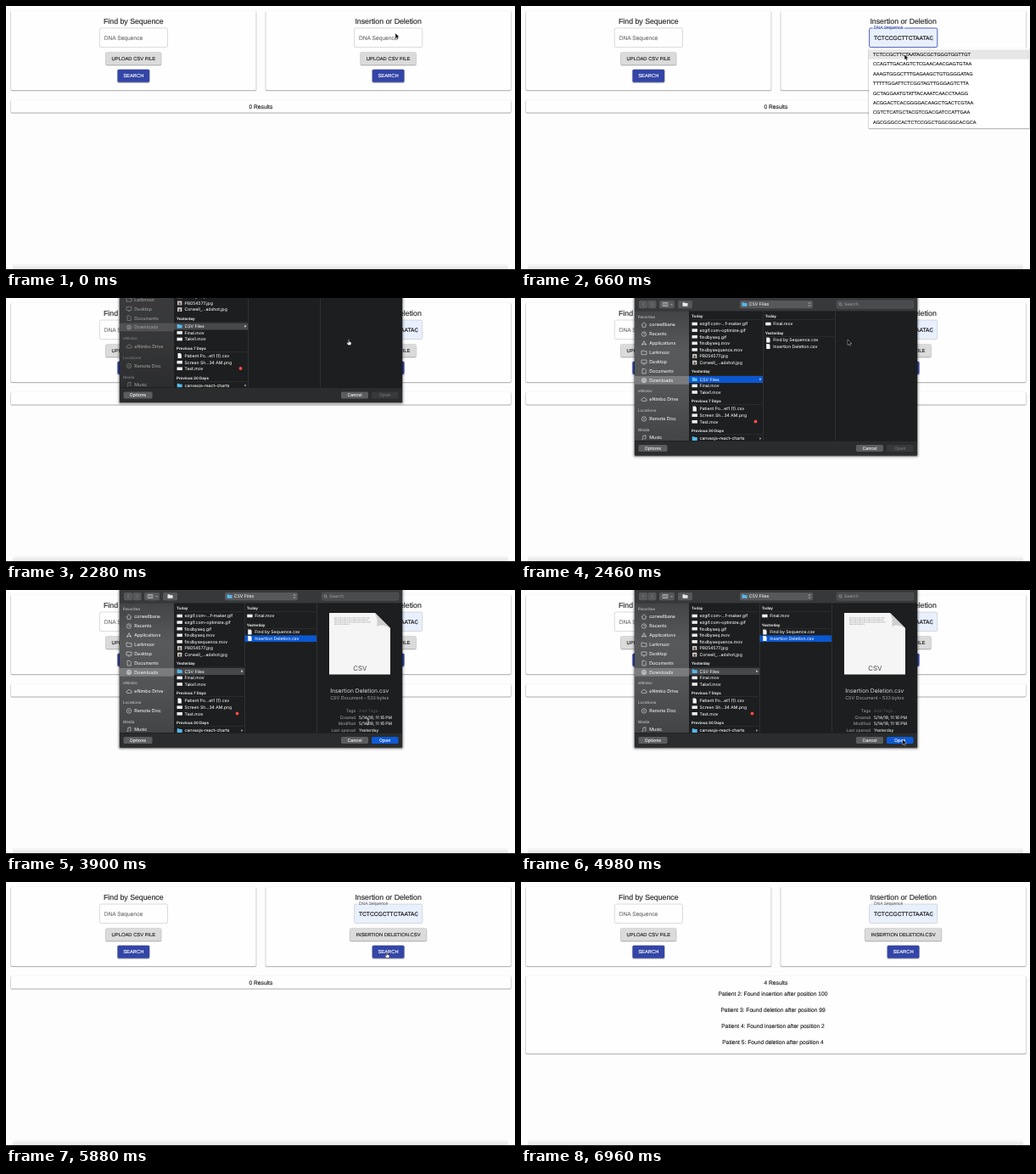
Write an HTML page that moves like this. It is 600 by 311 pixels and loops after 7.2 s.

```html
<!DOCTYPE html>
<html lang="en">
<head>
<meta charset="utf-8">
<title>DNA sequence search</title>
<style>
html, body { margin: 0; width: 100%; height: 100%; overflow: hidden; background: #fdfdfd; }
svg { display: block; width: 100vw; height: 100vh; }
text { font-family: "Liberation Sans", Arial, sans-serif; text-rendering: geometricPrecision; white-space: pre; stroke-width: .14; }
.mac text { font-family: Inter, Roboto, sans-serif; stroke-width: .06; }
</style>
</head>
<body>
<svg id="stage" viewBox="0 0 600 311"></svg>
<script>
const LOOP = 7200, STEP = 60;
const stage = document.getElementById('stage');

// Moments at which the interface changes state
const FOCUS = 120, MENU = 420, FILL = 600, MENU_END = 840, BLUR = 1500,
  SHEET = 2220, FOLDER = 2400, PICK = 3300, PREVIEW = 3600,
  SHEET_END = 5340, UPLOADED = 5400, RESULTS = 5940, POINTER_END = 6960;

// Time, x, y, shape
const pointerKeys = [
  [0, 459, 32, 'arrow'], [420, 459, 32, 'arrow'], [660, 452, 57, 'arrow'], [840, 452, 57, 'arrow'],
  [1140, 443, 74, 'arrow'], [1200, 443, 75, 'hand'], [1440, 448, 61, 'hand'], [1740, 448, 61, 'hand'],
  [2040, 404, 49, 'hand'], [2280, 404, 49, 'hand'], [2340, 400, 49, 'arrow'], [2460, 385, 49, 'arrow'],
  [2940, 321, 46, 'arrow'], [3240, 319, 56, 'arrow'], [3540, 319, 56, 'arrow'],
  [3840, 420, 145, 'ibeam'], [3900, 427, 155, 'ibeam'], [4260, 444, 170, 'arrow'],
  [4680, 449, 176, 'arrow'], [5100, 450, 176, 'arrow'], [5220, 450.5, 178.4, 'arrow'], [5400, 450, 178, 'arrow'],
  [5820, 449, 83, 'hand'], [6000, 449, 83, 'hand'], [6120, 444, 96, 'arrow'], [6360, 434, 125, 'arrow'],
  [6540, 434, 125, 'arrow'], [6660, 458, 65, 'arrow'], [6780, 455, 13, 'arrow'], [LOOP, 455, 13, 'arrow']
];
const openKeys = [[SHEET, -150], [2280, -62.5], [2340, -22], [2400, -5], [2460, 0]];
const closeKeys = [[5040, 0], [5100, -8], [5160, -42], [5220, -95.5], [5280, -150], [SHEET_END, -195]];
const sidebarDimKeys = [[2280, .35], [2460, 0]];

function sample(keys, t) {
  const last = keys.length - 1;
  if (t <= keys[0][0]) return keys[0].slice(1);
  if (t >= keys[last][0]) return keys[last].slice(1);
  const i = keys.findIndex(k => k[0] > t), a = keys[i - 1], b = keys[i];
  const p = (t - a[0]) / (b[0] - a[0]);
  return a.slice(1).map((v, j) => typeof v === 'number' ? v + (b[j + 1] - v) * p : v);
}

// y is the vertical middle of the capitals
const text = (x, y, size, str, fill = '#222', anchor = 'start', weight = 400) =>
  `<text x="${x}" y="${y + size * .36}" font-size="${size}" fill="${fill}" stroke="${fill}" text-anchor="${anchor}" font-weight="${weight}">${str}</text>`;
const rect = (x, y, w, h, fill, r = 0, more = '') =>
  `<rect x="${x}" y="${y}" width="${w}" height="${h}" rx="${r}" fill="${fill}" ${more}/>`;
const path = (x, y, d, stroke, fill = 'none', width = .6) =>
  `<path transform="translate(${x} ${y})" d="${d}" stroke="${stroke}" fill="${fill}" stroke-width="${width}"/>`;
const dot = (x, y, r, fill) => `<circle cx="${x}" cy="${y}" r="${r}" fill="${fill}"/>`;

// Soft shadow from stacked rectangles: each layer is [spread, opacity]
const shadow = (x, y, w, h, r, drop, layers) => layers.map(([s, alpha]) =>
  rect(x - s, y - s + drop, w + 2 * s, h + 2 * s, `rgba(0,0,0,${alpha})`, r + s)).join('');
const raised = (x, y, w, h, fill, r) =>
  shadow(x, y, w, h, r, .6, [[1.2, .05], [.7, .1], [.2, .2]]) + rect(x, y, w, h, fill, r);
const panel = (x, y, w, h) => raised(x, y, w, h, '#fefefe', 1.2);

function button(cx, cy, w, label, bg, fg) {
  return raised(cx - w / 2, cy - 7.5, w, 15, bg, 1.6) + text(cx, cy, 5.83, label, fg, 'middle');
}

function field(x, { focused = false, shrink = 0, value = '' } = {}) {
  const edge = focused ? '#3f51b5' : '#c2c2c2', labelX = x + 5.7;
  let out = rect(x + .3, 26, 80.2, 22.6, value ? '#e8f0fe' : '#fefefe', 1.7,
    `stroke="${edge}" stroke-width="${focused ? .9 : .6}"`);
  if (shrink === 1) out += rect(x + 4, 25.2, 38, 1.3, value ? '#f2f6fe' : '#fefefe');
  out += text(labelX, 37.2 - 11.6 * shrink, 6.67 - 1.67 * shrink, 'DNA Sequence', focused ? '#3f51b5' : '#777');
  if (value) out += `<g clip-path="url(#value)">${text(labelX, 37.2, 6.67, value, '#111')}</g>`;
  return out;
}

function form(x, title, fieldState, uploadLabel, uploadWidth) {
  const cx = x + 144.3;
  return panel(x, 6, 288.7, 93) +
    text(cx, 17.4, 8.75, title, '#222', 'middle') + field(cx - 40.3, fieldState) +
    button(cx, 61.8, uploadWidth, uploadLabel, '#dbdbdb', '#222') +
    button(cx, 82.2, 37.6, 'SEARCH', '#3345a6', '#fff');
}

function results(t) {
  if (t < RESULTS) return panel(6, 111, 589, 14.4) + text(300.4, 118.5, 6.67, '0 Results', '#222', 'middle');
  const found = [['insertion', 100], ['deletion', 99], ['insertion', 2], ['deletion', 4]];
  return panel(6, 111, 589, 91) + text(300.4, 118.5, 6.67, '4 Results', '#222', 'middle') +
    found.map(([kind, at], i) => text(297, 131.7 + 19.1 * i, 6.67,
      `Patient ${i + 2}: Found ${kind} after position ${at}`, '#222', 'middle')).join('');
}

const sequence = 'TCTCCGCTTCTAATAG';
const randomBase = seed => 'ACGT'[Math.floor(Math.abs(Math.sin(seed * 12.9898) * 43758.5453) % 1 * 4)];
function suggestions() {
  const rows = Array.from({ length: 8 }, (_, i) => {
    const bases = Array.from({ length: 30 }, (_, j) => i || j >= 16 ? randomBase(i * 31 + j + 1) : sequence[j]);
    return text(415, 57 + 11.4 * i, 5.6, bases.join(''));
  });
  return raised(410, 50, 189.5, 94, '#fff', 1) + rect(410, 51.5, 189.5, 11.2, '#e6e6e6') + rows.join('');
}

const ring = 'M-2.7 0a2.7 2.7 0 1 0 5.4 0a2.7 2.7 0 1 0-5.4 0';
const folderShape = 'M-3-2.3H-.6L0-1.6H3V2.3H-3Z';
const sidebarItems = [
  [22, 'Favorites'],
  [31.5, 'corwellbane', 'M-3 .2L0-2.8 3 .2M-2-.5V2.7H2V-.5'],
  [42.5, 'Recents', ring + 'M0-1.6V0H1.4'],
  [53.4, 'Applications', 'M-2.4 2.6L0-2.8 2.4 2.6M-3 .9H3'],
  [64.4, 'Larkmoor', folderShape],
  [75.3, 'Desktop', 'M-3-2.3H3V1.6H-3ZM-1.2 2.7H1.2'],
  [86.2, 'Documents', 'M-2-2.8H.9L2.2-1.5V2.8H-2Z'],
  [97, 'Downloads', ring + 'M0-1.5V1.5M-1.2 .3L0 1.5 1.2 .3'],
  [109.7, 'eNimbo'],
  [119.5, 'eNimbo Drive', 'M-1.8 1.9H2a1.3 1.3 0 0 0 0-2.6A2 2 0 0 0-1.8-.7A1.3 1.3 0 0 0-1.8 1.9Z'],
  [132.4, 'Locations'],
  [142.4, 'Remote Disc', ring + 'M-.7 0H.7M0-.7V.7'],
  [155.4, 'Media'],
  [164.5, 'Music', 'M-1.2 2V-2.2L2-2.8V1.4M-2.4 2H-1.2M.8 1.5H2']
];

function sidebar(t) {
  const [dim] = sample(sidebarDimKeys, t);
  return rect(134, 15.5, 64, 153, 'url(#side)') + rect(134, 92, 64, 9.7, '#7a7c7e') +
    sidebarItems.map(([y, label, icon]) => icon
      ? path(145, y, icon, '#e4e4e4', label === 'Downloads' ? '#9a9c9e' : 'none') + text(151.3, y, 5.3, label, '#f0f0f0')
      : text(138, y, 4.55, label, '#b4b5b6', 'start', 500)).join('') +
    rect(134, 15.5, 64, 153, `rgba(0,0,0,${dim})`);
}

function fileIcon(kind, x, y) {
  if (kind === 'folder') return path(x, y, folderShape, 'none', '#55b8ea');
  if (kind === 'csv') return path(x, y, 'M-2.2-3H.8L2.2-1.6V3H-2.2Z', 'none', '#f4f4f4');
  if (kind === 'jpg') return rect(x - 2.6, y - 2.4, 5.2, 4.8, '#d8d5d2') + rect(x - 1.2, y - 1.2, 2.4, 3.6, '#6d5650', 1);
  return rect(x - 3.2, y - 1.8, 6.4, 3.6, '#eee');
}

function fileRow(x, y, name) {
  const kind = name.includes('.') ? name.split('.').pop() : 'folder';
  return fileIcon(kind, x + 3.7, y) + text(x + 9.5, y, 5.1, name, '#f2f2f2');
}

function section(x, right, y, title, firstRow, names) {
  return text(x, y, 4.5, title, '#eee', 'start', 600) + rect(x, y + 4.1, right - x - 1, .35, '#444') +
    names.map((name, i) => fileRow(x, firstRow + 7.6 * i, name)).join('');
}

const chevron = (x, y, color) => path(x, y, 'M-.9-1.5L1.2 0-.9 1.5Z', 'none', color);

function columns(t) {
  const edge = t >= PREVIEW ? 281 : 285, active = t >= FOLDER && t < PICK, x = edge + 2.7;
  let out = rect(198, 15.5, 269, 153, '#1d1e1f') +
    rect(198, 92, edge - 198, 8, active ? '#0a57d0' : '#47484a') +
    section(201, edge, 21, 'Today', 30.5, ['ezgif.com-...f-maker.gif', 'ezgif.com-optimize.gif', 'findbyseq.gif',
      'findbyseq.mov', 'findbysequence.mov', 'PB054577.jpg', 'Corwell_...adshot.jpg']) +
    section(201, edge, 86.8, 'Yesterday', 95.8, ['CSV Files', 'Final.mov', 'Take1.mov']) +
    section(201, edge, 121.5, 'Previous 7 Days', 130.6, ['Patient Po...et1 (1).csv', 'Screen Sh...34 AM.png', 'Test.mov']) +
    section(201, edge, 156.5, 'Previous 30 Days', 165.6, ['canvasjs-react-charts']) +
    dot(edge - 8.5, 145.5, 1.9, '#ff4a42') + chevron(edge - 2.8, 95.8, '#ddd') + chevron(edge - 2.8, 165.6, '#aaa');
  if (t >= FOLDER) {
    if (t >= PICK) out += rect(edge, 53.4, 85, 7.7, '#0a57d0');
    out += section(x, edge + 85, 21, 'Today', 30.5, ['Final.mov']) +
      section(x, edge + 85, 41, 'Yesterday', 49.4, ['Find by Sequence.csv', 'Insertion Deletion.csv']);
  }
  return out + [edge, edge + 85].map(c => rect(c, 15.5, .6, 153, '#3c3d3f')).join('') +
    (t >= PREVIEW ? preview() : '');
}

function preview() {
  const info = [['Tags', 'Add Tags...'], ['Created', '5/14/19, 11:16 PM'],
    ['Modified', '5/14/19, 11:16 PM'], ['Last opened', 'Yesterday']];
  const lines = [42, 40, 43, 18].map((w, i) =>
    `<path d="M387 ${33 + 2.4 * i}h${w}" stroke="#999" stroke-width=".7" stroke-dasharray="3 .6 1.4 .5"/>`);
  return path(381, 27, 'M0 0H54L72 18V72.5H0Z', 'none', '#f5f5f5') +
    path(435, 27, 'M0 0L18 18Q8 12 2 16Q4 8 0 0Z', 'none', '#cfcfcf') + lines.join('') +
    text(417.3, 92.3, 7.8, 'CSV', '#555', 'middle') +
    text(416.7, 118.5, 6.75, 'Insertion Deletion.csv', '#c9c9c9', 'middle') +
    text(416.7, 127.3, 5.35, 'CSV Document - 533 bytes', '#9c9c9c', 'middle') +
    info.map(([key, value], i) => text(412, 142.5 + 7.6 * i, 4.9, key, '#9a9a9a', 'end') +
      text(416, 142.5 + 7.6 * i, 4.95, value, i ? '#e8e8e8' : '#555')).join('');
}

function toolbar() {
  const box = (x, w) => rect(x, 3, w, 9.2, '#57585a', 1.6);
  return rect(134, -5, 333, 20.5, '#37383a') + box(139, 10) + box(149.5, 10) + box(163, 18) + box(185, 17) + box(258, 86) +
    path(144, 7.5, 'M1-1.8L-1 0 1 1.8', '#8a8b8d') + path(154.5, 7.5, 'M-1-1.8L1 0-1 1.8', '#8a8b8d') +
    path(170, 7.5, 'M-3-2H3V2H-3ZM-1-2V2M1-2V2', '#ddd') + path(177.5, 7.5, 'M-1-.5L0 .7 1-.5', '#ddd') +
    path(193.5, 7.5, folderShape, 'none', '#e8e8e8') +
    path(263.5, 7.5, folderShape, 'none', '#55b8ea') + text(268.7, 7.6, 5.2, 'CSV Files', '#eee') +
    path(340, 7.5, 'M-1.2-.8L0-2.2 1.2-.8M-1.2 .8L0 2.2 1.2 .8', '#eee') +
    rect(372, 3, 91, 9.2, '#4a4b4d', 1.6, 'stroke="#626365" stroke-width=".4"') +
    path(376.5, 7.2, 'M-1.6 0a1.5 1.5 0 1 0 3 0a1.5 1.5 0 1 0-3 0M1 1.1L2.2 2.3', '#bbb') +
    text(381, 7.6, 5.1, 'Search', '#98999b');
}

function footer(t) {
  const ready = t >= PICK;
  const control = (x, w, label, bg, fg) => rect(x, 173, w, 8, bg, 1.6) + text(x + w / 2, 177, 5.2, label, fg, 'middle', 500);
  return rect(134, 168, 333, 17.5, '#2b2c2d', 1.2) + rect(134, 168, 333, .4, '#111') +
    control(138.5, 34, 'Options', '#5c5d5f', '#eee') + control(395, 32, 'Cancel', '#5c5d5f', '#eee') +
    control(431, 31.5, 'Open', ready ? '#0d5bd7' : '#38393b', ready ? '#fff' : '#707173');
}

function fileSheet(t) {
  if (t < SHEET || t >= SHEET_END) return '';
  const [y] = sample(t < 4000 ? openKeys : closeKeys, t);
  return `<g class="mac" transform="translate(0 ${y})">${
    shadow(134, -5, 333, 190.5, 1.2, .5, [[3.5, .04], [2.5, .06], [1.6, .1], [.8, .35]])}${
    rect(134, -5, 333, 190.5, '#2b2c2d', 1.2)}${toolbar()}${columns(t)}${sidebar(t)}${footer(t)}</g>`;
}

const shapes = {
  arrow: ['M0 0V6.3L1.5 5.1 2.4 7.2 3.6 6.7 2.7 4.6H4.7Z', '#fff', '#000', .4],
  hand: ['M-.6 0Q0-.6 .5 0V2.4L3 3.2V5L2.3 6.6H-.8L-2.4 3.9L-1.7 3.3L-.6 4.2Z', '#111', '#fff', .45],
  ibeam: ['M-1.3-3.3Q0-3.3 0-2.4Q0-3.3 1.3-3.3M0-2.4V2.6M-1.3 3.4Q0 3.4 0 2.6Q0 3.4 1.3 3.4', '#eee', 'none', .7]
};
function pointer(t) {
  if (t >= POINTER_END) return '';
  const [x, y, shape] = sample(pointerKeys, t), [d, stroke, fill, width] = shapes[shape];
  return path(x, y, d, stroke, fill, width);
}

const defs = `<defs>
<clipPath id="value"><rect x="414" y="28" width="71.3" height="19"/></clipPath>
<linearGradient id="side" x2="0" y2="1"><stop stop-color="#424446"/><stop offset=".3" stop-color="#58595b"/>
<stop offset=".62" stop-color="#535456"/><stop offset="1" stop-color="#434446"/></linearGradient>
<linearGradient id="base" x2="0" y2="1"><stop stop-color="#fdfdfd"/><stop offset="1" stop-color="#e4e4e4"/></linearGradient>
</defs>`;

function scene(t) {
  const state = {
    focused: t >= FOCUS && t < BLUR,
    shrink: t < FOCUS ? 0 : t < FOCUS + STEP ? .5 : 1,
    value: t >= FILL ? sequence : ''
  };
  const uploaded = t >= UPLOADED;
  return defs + rect(0, 0, 600, 311, '#fdfdfd') + rect(8, 303, 584, 7, 'url(#base)') + rect(0, 310, 600, 1, '#111') +
    form(6, 'Find by Sequence', {}, 'UPLOAD CSV FILE', 65) +
    form(306.3, 'Insertion or Deletion', state, uploaded ? 'INSERTION DELETION.CSV' : 'UPLOAD CSV FILE', uploaded ? 90 : 65) +
    results(t) + (t >= MENU && t < MENU_END ? suggestions() : '') + fileSheet(t) + pointer(t);
}

let shown = -1;
function tick() {
  const t = Math.floor(performance.now() % LOOP / STEP) * STEP;
  if (t !== shown) stage.innerHTML = scene(shown = t);
  requestAnimationFrame(tick);
}
tick();
</script>
</body>
</html>
```
